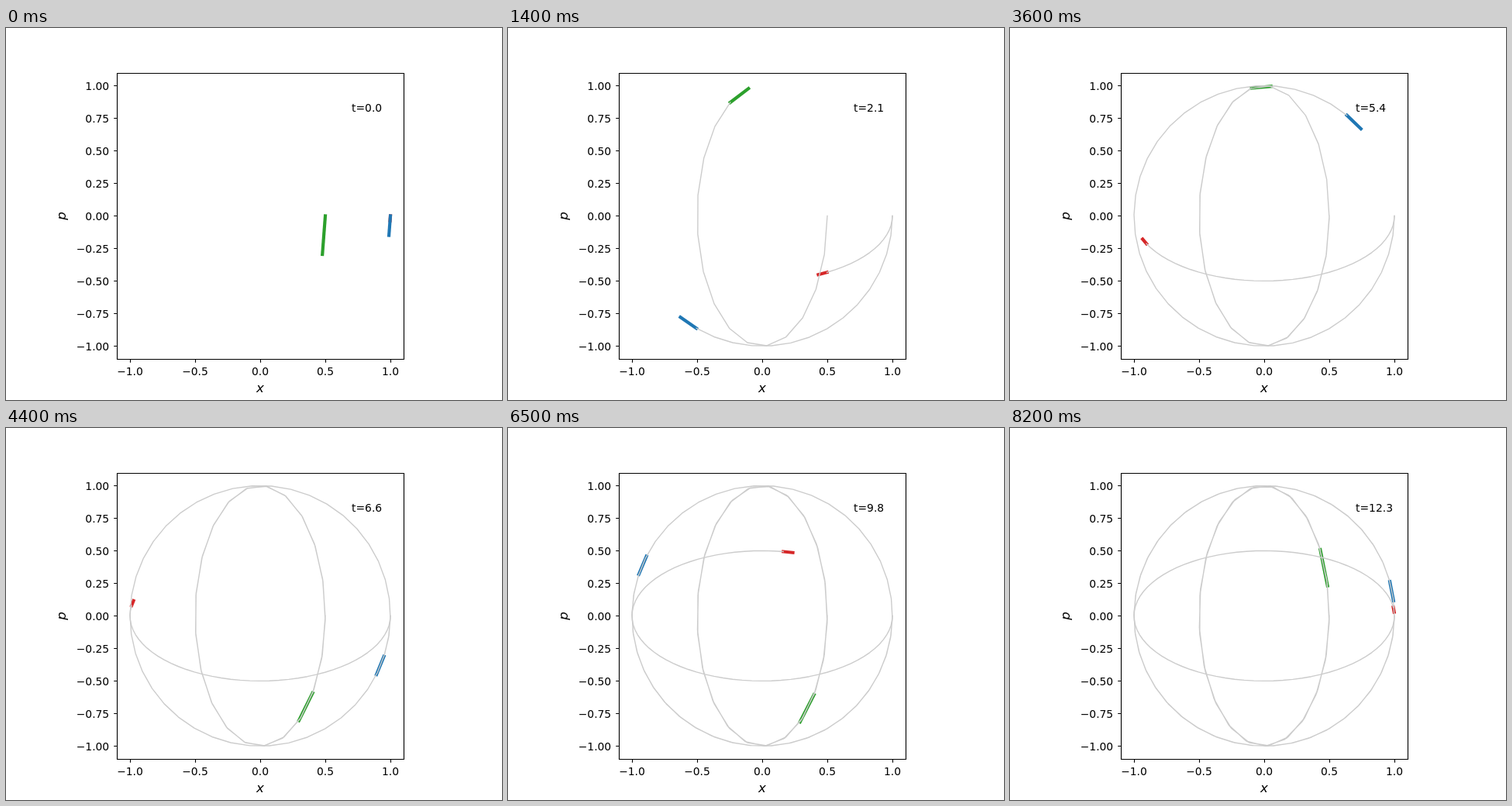
An HTML page with a canvas for the animation above (8.3 s loop, 640 by 480 pixels).

```html
<!DOCTYPE html>
<html lang="en">
<head>
<meta charset="utf-8">
<title>Phase space orbits</title>
<style>
  html, body { margin: 0; width: 100%; height: 100%; overflow: hidden; background: #fff; }
  canvas { display: block; }
</style>
</head>
<body>
<canvas id="stage" width="640" height="480"></canvas>
<script>
const ctx = document.getElementById('stage').getContext('2d');
const PT = 100 / 72;              // one point in pixels
const STEP = 0.15, STEPS = 83, STEP_MS = 100;
const FONT = '"DejaVu Sans", sans-serif';
const LEFT = 143.5, RIGHT = 513.5, TOP = 58.5, BOTTOM = 427.5;

// Harmonic oscillators: x = a cos(wt), p = -b sin(wt)
const orbits = [
  { a: 1, b: 0.5, w: 0.5, color: '#d62728' },
  { a: 0.5, b: 1, w: 2, color: '#2ca02c' },
  { a: 1, b: 1, w: 1, color: '#1f77b4' },
];

const toX = x => 328 + 168 * x;
const toY = p => 242.4 - 168 * p;

function strokeOrbit({ a, b, w }, from, to, color, width) {
  ctx.beginPath();
  for (let i = from; i <= to; i++) {
    const phase = w * STEP * i;
    ctx.lineTo(toX(a * Math.cos(phase)), toY(-b * Math.sin(phase)));
  }
  ctx.strokeStyle = color;
  ctx.lineWidth = width * PT;
  ctx.stroke();
}

function text(str, x, y, align = 'left', size = 10, style = '') {
  ctx.font = `${style} ${size * PT}px ${FONT}`;
  ctx.textAlign = align;
  ctx.fillText(str, x, y);
}

const label = (v, digits) => v.toFixed(digits).replace('-', '\u2212');

function drawAxes() {
  ctx.fillStyle = ctx.strokeStyle = '#000';
  ctx.lineWidth = 0.8 * PT;
  ctx.beginPath();
  ctx.rect(LEFT, TOP, RIGHT - LEFT, BOTTOM - TOP);
  for (let v = -1; v <= 1; v += 0.5) {
    const x = toX(v) + 0.5;
    ctx.moveTo(x, BOTTOM);
    ctx.lineTo(x, BOTTOM + 4.3);
    text(label(v, 1), toX(v), 448, 'center');
  }
  for (let v = -1; v <= 1; v += 0.25) {
    const y = Math.floor(toY(v)) + 0.5;
    ctx.moveTo(LEFT, y);
    ctx.lineTo(LEFT - 4.3, y);
    text(label(v, 2), 133.2, y + 5.5, 'right');
  }
  ctx.stroke();

  text('x', 328, 470, 'center', 12, 'italic');
  ctx.save();
  ctx.translate(77, 242.4);
  ctx.rotate(-Math.PI / 2);
  text('p', 0, 0, 'center', 12, 'italic');
  ctx.restore();
}

function draw(step) {
  ctx.fillStyle = '#fff';
  ctx.fillRect(0, 0, 640, 480);
  ctx.lineCap = 'square';
  ctx.lineJoin = 'round';
  for (const o of orbits) strokeOrbit(o, step, step + 1, o.color, 3);
  if (step > 0) for (const o of orbits) strokeOrbit(o, 0, step, '#ccc', 1);

  ctx.lineCap = 'butt';
  ctx.lineJoin = 'miter';
  drawAxes();

  // Tenths, with halves rounded to even
  const n = step * 1.5;
  const tenths = n % 1 ? 2 * Math.round(n / 2) : n;
  text('t=' + (tenths / 10).toFixed(1), 446, 108);
}

function tick() {
  draw(Math.floor(performance.now() / STEP_MS) % STEPS);
  requestAnimationFrame(tick);
}
tick();
</script>
</body>
</html>
```
